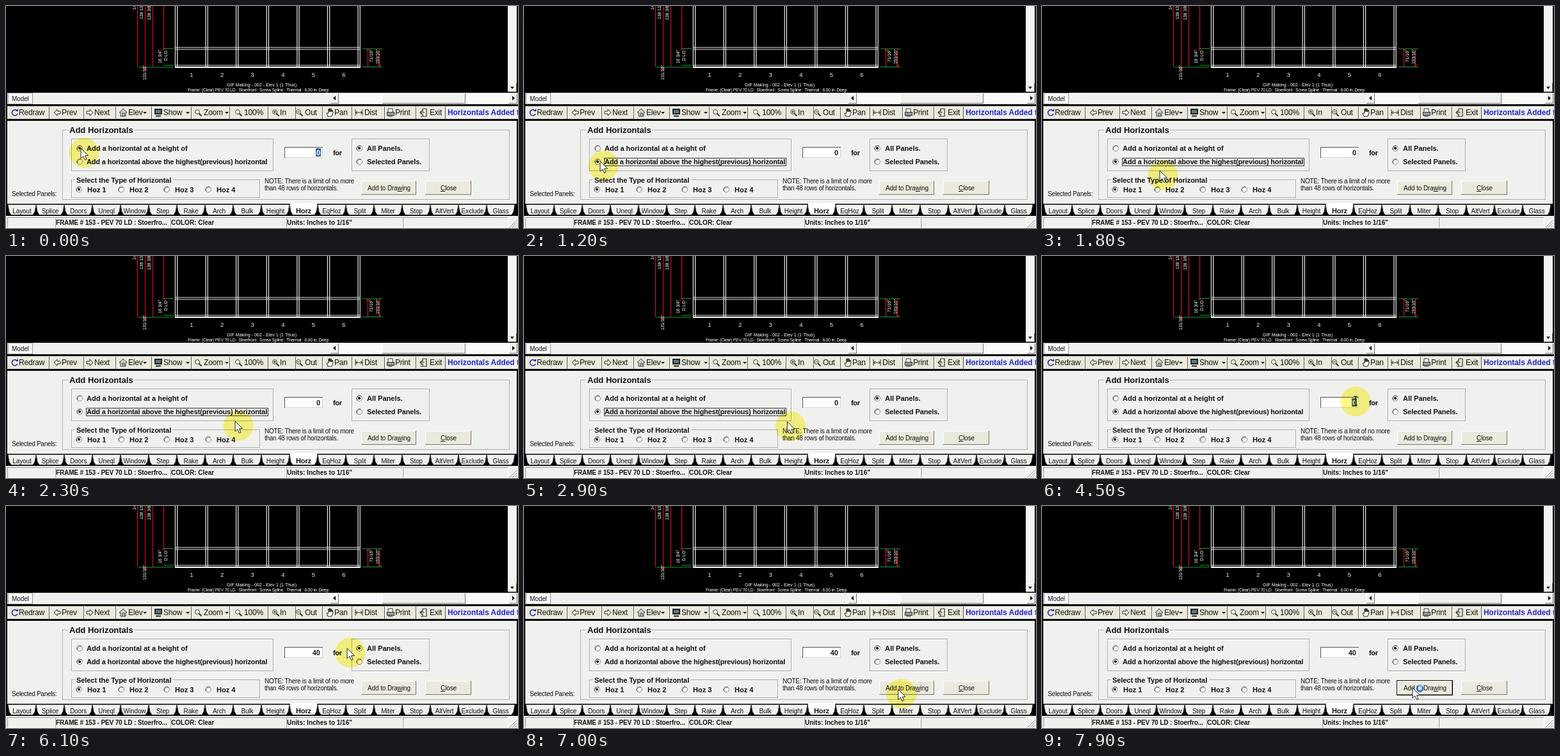
These frames come from a looping animation (800 by 348 pixels, 8000 ms). An HTML page:

```html
<!DOCTYPE html>
<html lang="en">
<head>
<meta charset="utf-8">
<title>Add Horizontals</title>
<style>
html, body { margin: 0; width: 100%; height: 100%; overflow: hidden; background: #000; }
svg { display: block; font-family: "Liberation Sans", Arial, sans-serif; }
text { white-space: pre; }
rect, .crisp { shape-rendering: crispEdges; }
</style>
</head>
<body>
<svg id="stage" width="800" height="348" viewBox="0 0 800 348"></svg>
<script>
const FACE = '#f0f0ef', BEIGE = '#ebe9dc', INK = '#111';
const stage = document.getElementById('stage');
let out = '';

const rect = (x, y, w, h, fill, extra = '') =>
  out += `<rect x="${x}" y="${y}" width="${w}" height="${h}" fill="${fill}" ${extra}/>`;
const path = (d, stroke = INK, width = 1, fill = 'none', extra = '') =>
  out += `<path d="${d}" stroke="${stroke}" stroke-width="${width}" fill="${fill}" ${extra}/>`;
const text = (x, y, s, size, { bold, gap = 0, fill = INK, anchor = 'start', extra = '' } = {}) =>
  out += `<text x="${x}" y="${y}" font-size="${size}" font-weight="${bold ? 700 : 400}" ` +
    `letter-spacing="${gap}" fill="${fill}" text-anchor="${anchor}" ${extra}>${s}</text>`;
const label = (x, y, s, gap) => text(x, y, s, 11, { bold: true, gap });
const circle = (x, y, r, fill, stroke = 'none', extra = '') =>
  out += `<circle cx="${x}" cy="${y}" r="${r}" fill="${fill}" stroke="${stroke}" ${extra}/>`;
const under = c => `<tspan text-decoration="underline">${c}</tspan>`;

function group(x, y, w, h) {
  rect(x + 1.5, y + 1.5, w, h, 'none', 'stroke="#fff"');
  rect(x + .5, y + .5, w, h, 'none', 'stroke="#a5a5a3"');
}
function bevel(x, y, w, h, fill = FACE) {
  rect(x, y, w, h, fill);
  path(`M${x} ${y + h - .5}H${x + w - .5}V${y}`, '#77756c', 1, 'none', 'class="crisp"');
  path(`M${x + .5} ${y + h - 1}V${y + .5}H${x + w - 1}`, '#fff', 1, 'none', 'class="crisp"');
}
function radio(x, y, id) {
  circle(x, y, 4.4, '#fff', '#858585');
  path(`M${x - 3} ${y + 3}A4.4 4.4 0 0 1 ${x + 3} ${y - 3}`, '#555');
  if (id) circle(x, y, 2, '#000', 'none', `id="${id}"`);
}

function drawing() {
  rect(0, 0, 800, 136, '#000');
  for (let i = 0; i < 7; i++) {
    const x = 266 + i * 47.6;
    path(`M${x - 1.6} 0V96M${x + 1.6} 0V96`, '#eee', 1.2);
    if (i < 6) text(x + 24, 110.5, i + 1, 9.5, { fill: '#eee', anchor: 'middle' });
  }
  path('M264 65H553M264 68H553M264 93H553', '#eee', 1.2);
  path('M264 96H554', '#fff', 2);
  path('M205.5 0V96M217.5 0V99M229.5 0V95M246.5 0V68', '#c81420', 1.2);
  path('M565.5 67V95M583.5 67V95', '#c81420', 1.2);
  path('M207 96H262M246 66.5H262M246 93H262M557 67H588M557 95.5H588', '#16a02c', 1.2);
  path('M214 97l3 4 3-4M244 70l2.500-4 2.500 4M563 71l2.500-4 2.500 4M581 91l2.500 4 2.500-4', '#c81420');
  const dims = [[203, 6, '140'], [214, 21, '138 13/16"'], [226, 22, '138 3/8"'], [243, 90, '16 3/4"'],
    [252, 86, 'D LO'], [219, 116, '131/16"'], [573, 88, '71/16"'], [583, 91, '193/16"']];
  for (const [x, y, s] of dims)
    text(0, 0, s, 7, { fill: '#fff', gap: -.1, extra: `transform="translate(${x} ${y}) rotate(-90)"` });
  text(399.5, 126, 'GIF Making - 002 - Elev 1 (1 Thus)', 7.1, { fill: '#fff', anchor: 'middle' });
  text(394, 133.5, 'Frame: (Clear) PEV 70 LD : Stoerfront : Screw Spline : Thermal : 6.00 in. Deep', 6.8,
    { fill: '#fff', gap: -.22, anchor: 'middle' });
}

function scrollbars() {
  rect(784, 0, 14, 135, '#f3f3f1');
  bevel(784, 121, 14, 14);
  path('M788 126.500h6l-3 3.500z', 'none', 0, '#000');
  rect(2, 136, 798, 18, FACE);
  rect(3, 136, 38, 17, '#fafafa', 'stroke="#999"');
  text(9, 149, 'Model', 10, { gap: -.1 });
  bevel(507, 137, 13, 16);
  path('M515 141v7l-4-3.500z', 'none', 0, '#000');
  rect(520, 137, 266, 16, '#fafaf9');
  bevel(588, 137, 130, 16);
  bevel(786, 137, 13, 16);
  path('M791 141v7l4-3.500z', 'none', 0, '#000');
}

function lens(x, sign = '') {
  circle(x - 1, 166, 3.4, '#fff', '#333');
  path(`M${x + 1.500} 168.500l4 4`, '#333', 2);
  if (sign) path(sign === '+' ? `M${x - 3} 166h4m-2 -2v4` : `M${x - 3} 166h4`);
}
function toolbar() {
  rect(0, 154, 800, 27, '#000');
  rect(2, 157, 798, 20, BEIGE);
  for (const x of [67, 121, 171, 227, 289, 349, 409, 452, 494, 540, 591, 640, 686]) {
    rect(x, 158, 1, 19, '#555');
    rect(x + 1, 158, 1, 19, '#fff');
  }
  rect(687, 157, 113, 20, FACE);
  const names = { Redraw: 20, Prev: 87, Next: 138, Elev: 191, Show: 246, Zoom: 309, '100%': 372,
    In: 428, Out: 467, Pan: 513, Dist: 560, Print: 608, Exit: 662 };
  for (const s in names) text(names[s], 171, s, 12, { gap: -.2 });
  for (const x of [214, 281, 342]) path(`M${x} 166h6l-3 3z`, 'none', 0, '#000');
  path('M17 164a4.500 4.500 0 1 0 1 5', '#2430a8', 1.7);
  path('M15 165h4v-4z', 'none', 0, '#2430a8');
  path('M75 167l5-5v3h5v4h-5v3zM136 167l-5-5v3h-5v4h5v3z', '#222', 1, '#fff');
  path('M177 167l6-6 6 6h-2v6h-8v-6z', '#444', 1, '#ccc');
  path('M182 173v-5h3v5', '#444');
  rect(232, 161, 12, 9, '#222');
  rect(234, 163, 8, 5, '#577a87');
  path('M234 172.500h8', '#222', 2);
  lens(300); lens(363);
  lens(421, '+'); lens(458, '-');
  path('M501 168l2 5h6l2-6-1-4-1 3-1-5-1 5-1-6-1 6-1-5v7z', '#222', 1, '#fff');
  path('M546 162v10M557 162v10M546 167h11m-8 -2l-3 2 3 2m5 -4l3 2-3 2', '#333');
  path('M597 166v-5h7v5', '#333', 1, '#fff');
  rect(595, 166, 11, 5, '#999', 'stroke="#333"');
  path('M597 173h7', '#333');
  path('M651 161h6v12h-9M654 167h-7m3 -3l-3 3 3 3M651 161v5M651 169v4', '#333', 1.2);
  text(690, 171, 'Horizontals Added t', 11.9, { bold: true, fill: '#2424c4' });
}

function panel() {
  rect(2, 180, 798, 168, FACE);
  group(88, 194, 698, 109);
  rect(97, 190, 103, 10, FACE);
  text(99, 199, 'Add Horizontals', 13, { bold: true });
  group(102, 208, 315, 50);
  group(540, 208, 121, 50);
  group(102, 272, 294, 28);
  rect(108, 268, 153, 10, FACE);
  label(110, 276.5, 'Select the Type of Horizontal', -.07);
  label(126, 227, 'Add a horizontal at a height of', 0);
  label(126, 248, 'Add a horizontal above the highest(previous) horizontal', -.17);
  label(511, 233.5, 'for', -.3);
  label(564, 227, 'All Panels.', 0);
  label(564, 248, 'Selected Panels.', -.1);
  radio(115, 223, 'first');
  radio(115, 244, 'second');
  radio(552, 223, 'all');
  radio(552, 244);
  [114, 180, 251, 316].forEach((x, i) => {
    radio(x, 287.5, i ? '' : 'type');
    label(x + 13, 291.5, 'Hoz ' + (i + 1), 0);
  });
  rect(125.5, 238.5, 284, 12, 'none', 'id="focus" stroke="#333"');
  rect(435, 221, 60, 17, '#fff');
  path('M435.500 238V221.500H495', '#555', 1, 'none', 'class="crisp"');
  path('M436 237.500H494.500V222', '#d5d5d3', 1, 'none', 'class="crisp"');
  rect(484, 223, 8, 13, '#34659c', 'id="mark"');
  text(491, 233.5, '0', 11, { bold: true, anchor: 'end', extra: 'id="value"' });
  const note = { gap: -.27 };
  text(404, 278, 'NOTE: There is a limit of no more', 10, note);
  text(404, 289, 'than 48 rows of horizontals.', 10, note);
  text(9, 298, 'Selected Panels:', 10, { gap: -.3 });
  bevel(555, 274, 86, 22, BEIGE);
  rect(554.5, 273.5, 87, 23, 'none', 'id="pressed" stroke="#111"');
  text(565, 289, `Add to Dra${under('w')}ing`, 10, { gap: -.1 });
  bevel(655, 274, 72, 22, BEIGE);
  text(679, 289, `${under('C')}lose`, 10, { gap: -.1 });
}

function tabs() {
  rect(0, 310, 800, 19, '#000');
  const names = ('Layout Splice Doors Uneql Window Step Rake Arch Bulk Height Horz EqHoz ' +
    'Split Miter Stop AltVert Exclude Glass').split(' ');
  names.forEach((s, i) => {
    const x = 25 + 44 * i, on = s === 'Horz';
    path(`M${x - 22} 311.500l2 11 3 5h34l3-5 2-11`, '#333', 1, on ? '#fff' : FACE);
    if (on) rect(x - 21, 309, 42, 3, '#fff');
    text(x, 325, s, on ? 11 : 10, { bold: on, gap: -.1, anchor: 'middle' });
  });
  rect(0, 180, 2, 149, '#000');
  rect(798, 180, 2, 149, '#000');
  rect(0, 329, 800, 19, FACE);
  [[2, 74], [77, 179], [257, 180], [438, 181], [620, 164]].forEach(([x, w]) => {
    path(`M${x + .5} 347V331.500H${x + w}`, '#999', 1, 'none', 'class="crisp"');
    path(`M${x + 1} 346.500H${x + w + .5}V332`, '#fff', 1, 'none', 'class="crisp"');
  });
  text(78, 342.5, 'FRAME # 153 - PEV 70 LD : Stoerfro...', 10, { bold: true, gap: -.13 });
  text(258, 342.5, 'COLOR: Clear', 10, { bold: true });
  text(439, 342.5, 'Units: Inches to 1/16"', 10, { bold: true });
  path('M787 347l11-11M791 347l7-7M795 347l3-3', '#999');
}

function pointer() {
  circle(0, 0, 23.5, '#fffb86', 'none', 'id="halo" style="mix-blend-mode:multiply"');
  path('M0 0V16L3.800 12.500L6.500 18.500L9 17.500L6.500 11.700H11.500Z', '#222', 1, '#fff', 'id="arrow"');
  path('M-3 -7H-1L0 -6L1 -7H3M0 -6V6M-3 7H-1L0 6L1 7H3', '#222', 1.2, 'none', 'id="beam"');
  out += '<g id="busy">';
  circle(590.5, 286, 4.5, '#cfe4fa', '#2466c8', 'stroke-width="2.5"');
  path('M590.500 281.500a4.500 4.500 0 0 1 4.500 4.500', '#6fb4f4', 2.5, 'none', 'id="spin"');
  out += '</g>';
}

[drawing, scrollbars, toolbar, panel, tabs, pointer].forEach(draw => draw());
stage.innerHTML = out;

const el = id => document.getElementById(id);
const show = (id, on) => el(id).style.display = on ? '' : 'none';
const move = (id, x, y) => el(id).setAttribute('transform', `translate(${x} ${y})`);

// Pointer route: time, x, y
const route = [[0, 117, 223], [300, 116, 224], [700, 118, 246], [900, 119, 244], [1300, 119, 243],
  [1500, 127, 248], [1800, 184, 258], [2050, 270, 271], [2300, 358, 259], [2700, 394, 259],
  [3000, 420, 260], [3300, 444, 255], [3600, 442, 247], [3700, 444, 257], [3900, 472, 242],
  [4100, 490, 228], [4500, 490, 227], [5500, 490, 227], [5800, 510, 225], [6100, 533, 223],
  [6300, 566, 226], [6600, 588, 262], [6900, 586, 288], [7400, 579, 285], [8000, 579, 285]];

function at(t) {
  const i = Math.max(1, route.findIndex(k => k[0] >= t));
  const [t0, x0, y0] = route[i - 1], [t1, x1, y1] = route[i];
  const p = (t - t0) / (t1 - t0);
  return [x0 + (x1 - x0) * p, y0 + (y1 - y0) * p];
}

function frame() {
  const t = Math.floor(performance.now() % 8000 / 100) * 100;
  const [x, y] = at(t);
  const inBox = x > 435 && x < 495 && y > 221 && y < 238;
  const second = t >= 900, clicked = t >= 7700;
  const marked = t < 900 || t >= 4300 && t < 4900;
  show('first', !second);
  show('second', second);
  show('focus', second && t < 4300);
  show('mark', marked);
  el('value').textContent = t < 4900 ? '0' : t < 5200 ? '4' : '40';
  el('value').setAttribute('fill', marked ? '#fff' : INK);
  show('pressed', clicked);
  show('busy', clicked);
  el('spin').setAttribute('transform', `rotate(${t * .36} 590.5 286)`);
  show('halo', !clicked);
  show('arrow', !inBox);
  show('beam', inBox);
  // The halo is centred on the pointer's shape, not its tip
  move('halo', x + (inBox ? 0 : 5), y + (inBox ? 1 : 7));
  move('arrow', x, y);
  move('beam', x, y);
  requestAnimationFrame(frame);
}
frame();
</script>
</body>
</html>
```
